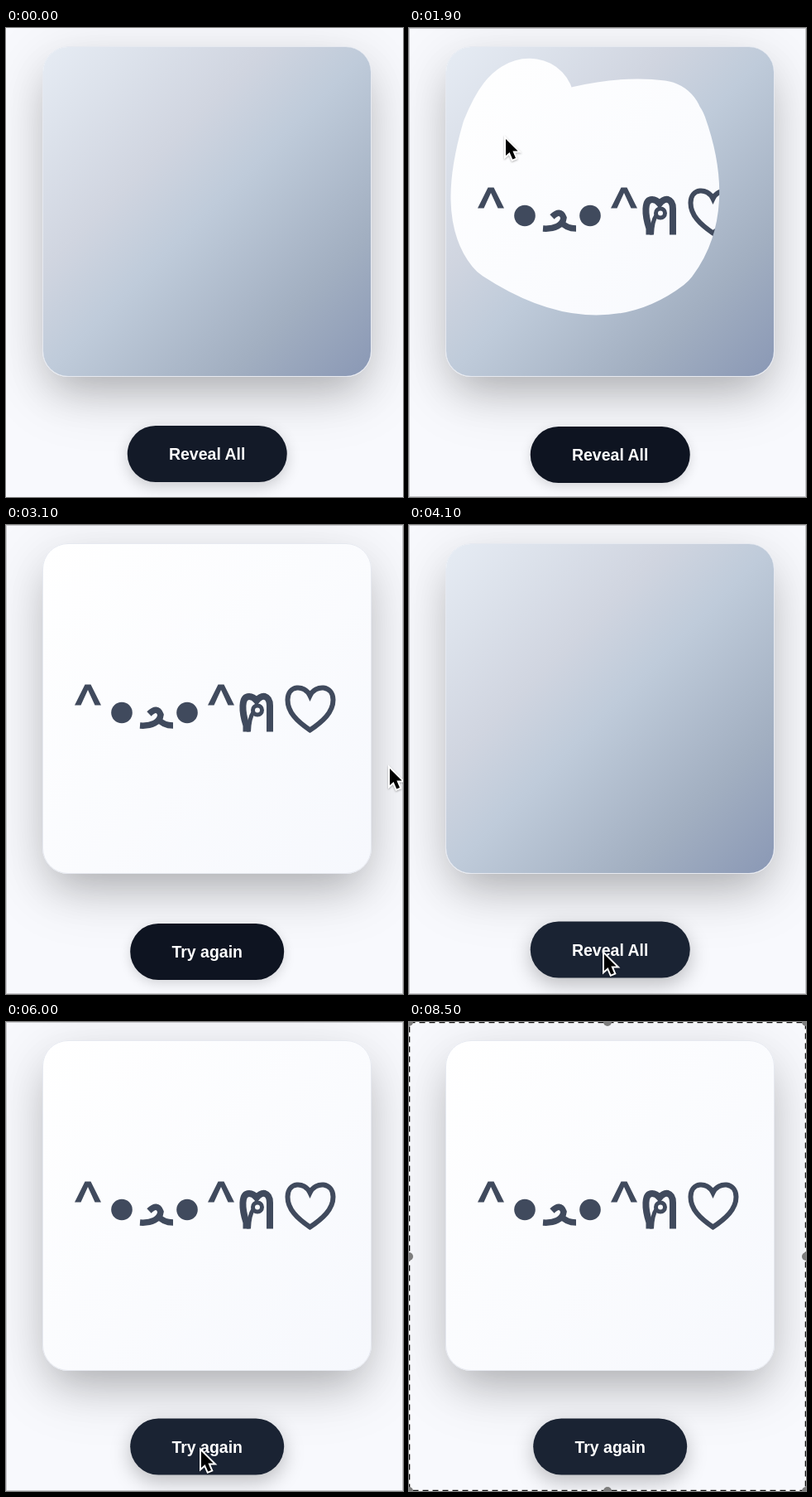
Recreate the animation shown at these times as an HTML page. Size 480 by 566 pixels, loop 8.6 s.

```html
<!DOCTYPE html>
<html lang="en">
<head>
<meta charset="utf-8">
<title>Scratch card</title>
<style>
  html, body { margin: 0; width: 100%; height: 100%; overflow: hidden; }
  body { position: relative; background: #f8f9fd; }
  body > * { position: absolute; box-sizing: border-box; }
  svg { left: 0; top: 0; width: 480px; height: 566px; }
  #card {
    left: 44px; top: 22px; width: 398px; height: 399px; border-radius: 31px;
    border: 1px solid #e6e9f0; background: linear-gradient(135deg, #fff, #f6f8fd);
    box-shadow: 0 25px 50px -12px rgba(0,0,0,.22), 0 18px 80px rgba(0,0,0,.14);
  }
  #button {
    left: 243.2px; top: 480.5px; height: 68px; padding: 0 50px; border-radius: 34px;
    font: bold 19.5px/68px "Liberation Sans", Arial, sans-serif;
    color: #fff; white-space: nowrap;
  }
  #popup {
    left: -300px; top: -200px; width: 1000px; height: 566px;
    background: #eeeeea; border-bottom: 1px solid #858585;
    box-shadow: 0 25px 60px rgba(0,0,0,.5);
    font: 20.5px/30px Inter, sans-serif; color: #58585a;
  }
  #popup div { position: absolute; white-space: pre; }
  #popup b { font-weight: 400; color: #101012; margin-right: 20px; }
  #popup .foot {
    left: 0; right: 0; top: 503px; height: 62px; border-top: 1px solid #d2d2d0;
    box-sizing: border-box; background: #e6e6e6; color: #18181f;
    font-size: 19.5px; font-weight: 600; line-height: 60px; padding-left: 694px;
  }
  #edge { inset: 0; border: 1px solid rgba(0,0,0,.2); }
</style>
</head>
<body>
<div id="card"></div>

<svg viewBox="0 0 480 566">
  <defs>
    <linearGradient id="silver" x2="1" y2="1">
      <stop stop-color="#e6ecf4"/>
      <stop offset=".34" stop-color="#d0d5e0"/>
      <stop offset=".5" stop-color="#bfcbda"/>
      <stop offset=".78" stop-color="#a2afc1"/>
      <stop offset="1" stop-color="#8a98b5"/>
    </linearGradient>
    <mask id="holes" maskUnits="userSpaceOnUse" x="0" y="0" width="480" height="566">
      <rect width="480" height="566" fill="#fff"/>
      <g id="strokes" fill="none" stroke="#000" stroke-width="106" stroke-linecap="round" stroke-linejoin="round"></g>
    </mask>
    <path id="hat" d="M83 217.5 95.500 192.500H102.500L115 217.500H107.500L99 199 90.500 217.500Z"/>
    <circle id="eye" cx="140" cy="226.500" r="12.800"/>
  </defs>
  <g role="img" aria-label="^●ᴥ●^ฅ♡" fill="#404a5d">
    <use href="#hat"/>
    <use href="#hat" x="161"/>
    <use href="#eye"/>
    <use href="#eye" x="79"/>
    <g fill="none" stroke="#404a5d" stroke-width="6">
      <path stroke-width="7.500" d="M173 228Q183 218 187 229C186 238 176 243 162 242M184 234Q190 242 202 242"/>
      <path stroke-width="8" d="M290.500 249.500V242C285 225 284 207 294 207Q299 207 303 212Q308 206 313 207Q319 209 319 218V249.500"/>
      <path stroke-width="5" d="M299 226Q294 233 293.500 249.500"/>
      <circle cx="304" cy="223.500" r="5.500" stroke-width="5"/>
      <path d="M367.500 247.500C352 237 340.500 226 340.500 211C340.500 193 361 192 367.500 206C374 192 395.500 193 395.500 211C395.500 226 383 237 367.500 247.500Z"/>
    </g>
  </g>
  <g mask="url(#holes)">
    <rect id="cover" x="45" y="23" width="396" height="397" rx="30" fill="url(#silver)"/>
  </g>
</svg>

<div id="button"></div>

<div id="popup"><div class="foot">Open App</div></div>

<div id="edge"></div>

<svg viewBox="0 0 480 566">
  <path id="cursor" d="M0 0V20L4.600 16 8.300 24.500 12 23 8.400 14.600H14.600Z" stroke="#fff" stroke-width="4" paint-order="stroke" style="filter:drop-shadow(0 1px 1px rgba(0,0,0,.3))"/>
  <g id="select" fill="none">
    <rect x=".5" y=".5" width="479" height="565" stroke="#fff" stroke-width="2"/>
    <rect x=".5" y=".5" width="479" height="565" stroke="#111" stroke-width="1.500" stroke-dasharray="7 5"/>
  </g>
</svg>

<script>
const LOOP = 8600, STEP = 100;
const $ = id => document.getElementById(id);
const make = (tag, parent, attrs) => {
  const el = document.createElementNS("http://www.w3.org/2000/svg", tag);
  for (const k in attrs) el.setAttribute(k, attrs[k]);
  return parent.appendChild(el);
};

const mix = (a, b, p) => a + (b - a) * p;
const ramp = (t, from, to) => Math.min(1, Math.max(0, (t - from) / (to - from)));
const during = (t, from, to) => t >= from && t < to;
const toggle = (id, on) => $(id).style.display = on ? "" : "none";

function stroke(d) {
  const el = make("path", $("strokes"), { d });
  const length = el.getTotalLength();
  return {
    tip(p) { return el.getPointAtLength(length * p); },
    show(p) {
      el.style.display = p > 0 ? "" : "none";
      el.setAttribute("stroke-dasharray", `${length * p + .01} ${length + 99}`);
    }
  };
}

// two strokes by hand, then an automatic zigzag in wavy rows
const first = stroke("M303 116Q240 108 152 140L147 90Q133 88 116 130Q90 220 118 255Q225 325 300 268Q340 215 308 125Q240 165 210 215L150 205 117 134");
const second = stroke("M117 134Q420 90 388 200T300 320");

const zigzag = [];
for (let row = 0; row < 4; row++)
  for (let i = 0; i <= 24; i++) {
    const x = mix(20, 385, (row % 2 ? 24 - i : i) / 24), u = x - 320;
    zigzag.push([x, 43 + 95 * row + 6 * Math.cos(u / 40 + row) + 4 * Math.cos(u / 13)]);
  }
const sweep = stroke("M" + zigzag.join(" "));

// launcher rows: right edge and leading title
[[77, ""], [178, "AI Chat"], [80, ""], [131, "Recent"], [64, ""]].forEach(([right, title], i) => {
  const el = document.createElement("div");
  el.style.cssText = `right:${700 - right}px;top:${235 + i * 62.4}px`;
  el.innerHTML = (title && `<b>${title}</b>`) + "Tolvane AI";
  $("popup").prepend(el);
});

for (const x of [0, 240, 480])
  for (const y of [0, 283, 566])
    if (x != 240 || y != 283) make("circle", $("select"), { cx: x, cy: y, r: 5, fill: "#7d7d7d" });

const scratched = t => ramp(t, 1000, 1600) * .97 + ramp(t, 1800, 1900) * .03;
const scratchedMore = t => ramp(t, 1900, 2500);

function pointer(t) {
  const glide = (a, b, p) => ({ x: mix(a.x, b.x, p), y: mix(a.y, b.y, p) });
  const aside = { x: 464, y: 294 }, onButton = { x: 236, y: 518 };
  if (t < 1000) return glide({ x: 405, y: 518 }, first.tip(0), ramp(t, 700, 1000));
  if (t < 1900) return first.tip(scratched(t));
  if (t < 3500) return glide(second.tip(scratchedMore(t)), aside, ramp(t, 2900, 3100));
  return glide(aside, onButton, ramp(t, 3400, 4000));
}

function draw(t) {
  const byHand = t < 4100;
  first.show(byHand ? scratched(t) : 0);
  second.show(byHand ? scratchedMore(t) : 0);
  sweep.show(.215 * ramp(t, 4920, 5200) + .785 * ramp(t, 5200, 5900));
  $("cover").style.opacity = byHand ? 1 - ramp(t, 2900, 3100) : 1 - ramp(t, 5800, 6000);

  const hover = .4 * (1 - ramp(t, 0, 200)) + ramp(t, 3700, 3900);
  const tint = (a, b) => mix(a, b, hover);
  const button = $("button");
  button.textContent = during(t, 3000, 4100) || t >= 5900 ? "Try again" : "Reveal All";
  button.style.transform = `translate(-50%, ${-2.5 * hover}px)`;
  button.style.background = `rgb(${tint(14, 26)},${tint(20, 35)},${tint(33, 51)})`;
  button.style.boxShadow = `0 ${tint(4, 8)}px ${tint(14, 24)}px rgba(0,0,0,${tint(.15, .25)})`;

  $("popup").style.opacity = ramp(t, 6600, 6900) - ramp(t, 7500, 7800);

  const recording = during(t, 100, 7900);
  toggle("edge", recording);
  toggle("cursor", recording);
  toggle("select", t >= 8500);
  const { x, y } = pointer(t);
  $("cursor").setAttribute("transform", `translate(${x} ${y})`);
}

const start = performance.now();
function tick() {
  const t = (performance.now() - start) % LOOP;
  draw(Math.floor(t / STEP) * STEP);
  requestAnimationFrame(tick);
}
tick();
</script>
</body>
</html>
```
